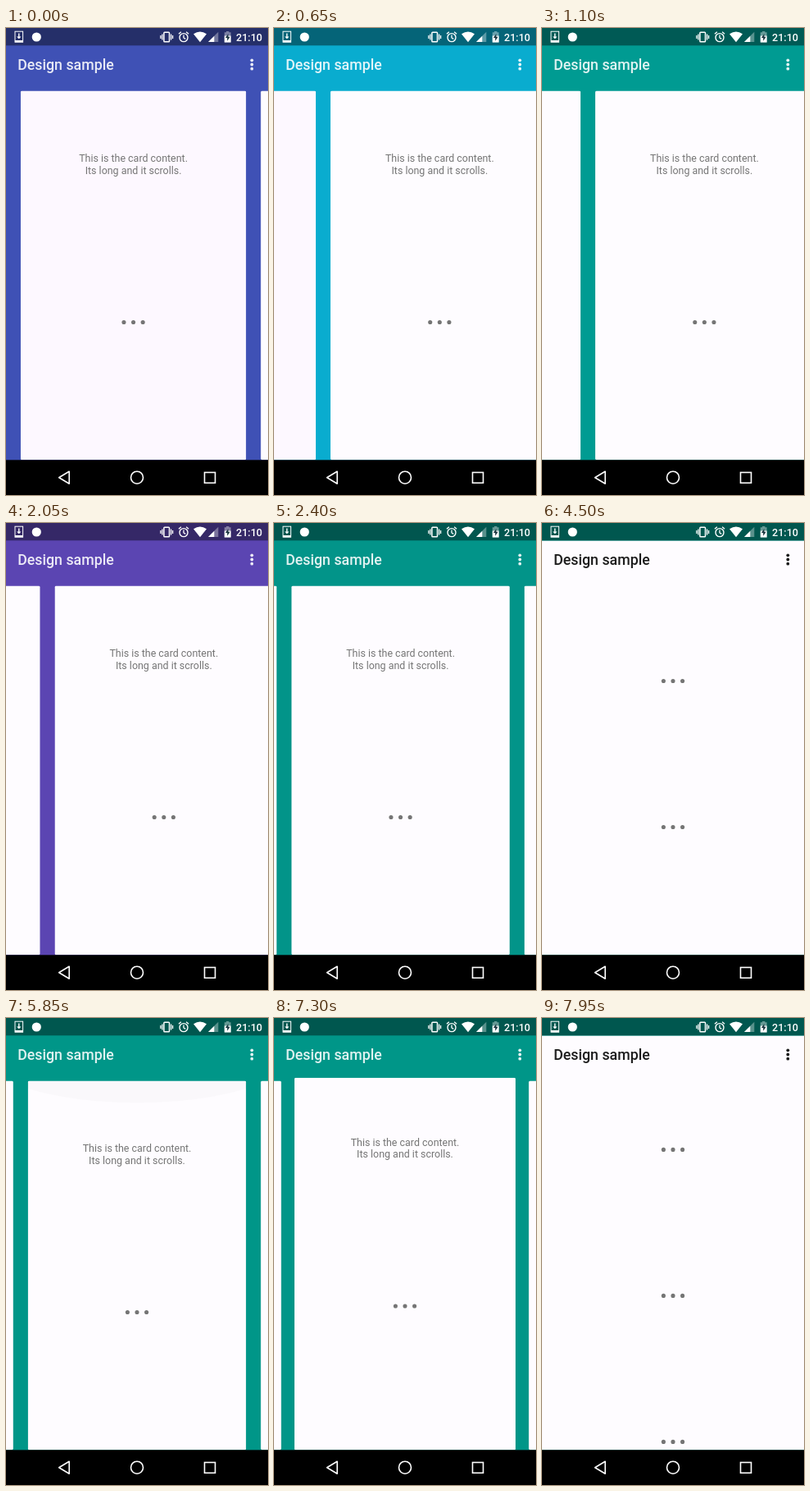
Animation of 320x569 px, one loop 8000 ms. Source, as an HTML page:

```html
<!DOCTYPE html>
<html lang="en">
<head>
<meta charset="utf-8">
<title>Design sample</title>
<style>
  html, body { margin: 0; width: 100%; height: 100%; overflow: hidden; background: #000; }
  #stage { display: block; width: 100%; height: 100%; }
  text { font-family: Roboto, "Noto Sans", sans-serif; }
  .body { font-size: 12.44px; fill: #757575; text-anchor: middle; }
  .title { font-size: 17.78px; font-weight: 500; }
  .clock { font-size: 12.6px; font-weight: 500; fill: #fff; }
  .line { fill: none; stroke: #fff; }
</style>
</head>
<body>
<svg id="stage" viewBox="0 0 320 569">
  <rect id="back" width="320" height="569"/>
  <g id="cards"></g>

  <g id="toolbar">
    <text class="title" x="14.2" y="51.2">Design sample</text>
    <circle cx="300.3" cy="39.3" r="1.9"/>
    <circle cx="300.3" cy="44.5" r="1.9"/>
    <circle cx="300.3" cy="49.7" r="1.9"/>
  </g>

  <rect id="status" width="320" height="21.33"/>
  <g fill="#fff">
    <rect class="line" x="11" y="4.2" width="9.6" height="13" stroke-width="1"/>
    <path d="M15.1 6.5h1.4v4h2L15.8 13.3 13.1 10.5h2zM11 15h9.6v2.2H11z"/>
    <circle cx="37.3" cy="11" r="5.6"/>
    <rect class="line" x="192.9" y="5.2" width="6.6" height="11.6" rx=".8" stroke-width="1.5"/>
    <path class="line" stroke-width="1.3" d="M190.9 7.5v7M188.9 9v4M201.6 7.5v7M203.6 9v4"/>
    <circle class="line" cx="217" cy="11.6" r="5" stroke-width="1.4"/>
    <path class="line" stroke-width="1.3" d="M217 8.6v3.4l2.3 1.4M210.9 7.3l3-2.5M223.1 7.3l-3-2.5"/>
    <path d="M229 7.3Q237 1.5 245 7.3L237 17.3z"/>
    <path d="M259.3 4.7V17H247z" opacity=".35"/>
    <path d="M254.3 9.7V17H247z"/>
    <path d="M269 4h3.4v1.3h2.2V17.5h-7.8V5.3h2.2z" opacity=".4"/>
    <path d="M266.8 9.5h7.8v8h-7.8z"/>
    <path d="M271.4 7l-3.4 5h2.2v3.8l3.4-5h-2.2z" fill="#17323c"/>
    <text class="clock" x="281" y="15.5">21:10</text>
  </g>

  <rect y="526.33" width="320" height="43"/>
  <g class="line" stroke-width="1.6">
    <path d="M64.7 547.7L77.2 540.3V555.2z" stroke-linejoin="round"/>
    <circle cx="160" cy="547.7" r="7.5"/>
    <rect x="242.5" y="541.5" width="13" height="12.8"/>
  </g>
</svg>

<script>
const LOOP = 8000, STEP = 50;
const MARGIN = 26.67, FIRST_MARGIN = 17.78, RIGHT = 320 - MARGIN, PITCH = 284.44;
const TOP = 76.44, OPEN_TOP = 21.33, BOTTOM = 526.33;
const OPEN_PAGE = 2, OPEN_DISTANCE = 112;
const $ = id => document.getElementById(id);

// Page colours: indigo, cyan, teal, deep purple, indigo
const colors = [[63, 81, 181], [0, 188, 212], [0, 150, 136], [103, 58, 183], [63, 81, 181]];

// Each move eases by 1 - (1 - u^pull)^drag: pull slows the start, drag the end
const pageMoves = [
  { at: 500, steps: 8, from: 0, to: PITCH, pull: 1.4, drag: 4 },
  { at: 1000, steps: 7, from: PITCH, to: 2 * PITCH, pull: 1, drag: 3.58 },
  { at: 1500, steps: 8, from: 2 * PITCH, to: 3 * PITCH, pull: 1.4, drag: 4 },
  { at: 2050, steps: 11, from: 3 * PITCH, to: 2 * PITCH, pull: 1.46, drag: 4 }
];
const scrollMoves = [
  { at: 3800, steps: 23, from: 0, to: 434.5, pull: 1.6, drag: 2.233 },
  { at: 5050, steps: 10, from: 434.5, to: 0, pull: 1.5, drag: 1.3 },
  { at: 7300, steps: 23, from: 0, to: 509, pull: 1.6, drag: 2.233 }
];
const GLOW_START = 5500, GLOW_END = 7300;

const clamp = v => Math.max(0, Math.min(1, v));
const lerp = (a, b, k) => a + (b - a) * k;
const mix = (a, b, k) => a.map((v, i) => lerp(v, b[i], k));
const rgb = c => `rgb(${c.map(Math.round).join()})`;

function valueAt(moves, t) {
  const move = moves.findLast(m => t >= m.at);
  if (!move) return moves[0].from;
  const u = clamp(((t - move.at) / STEP + 1) / move.steps);
  return lerp(move.from, move.to, 1 - (1 - u ** move.pull) ** move.drag);
}

// Overscroll glow left behind when the list hits its top
function glowAt(t) {
  if (t < GLOW_START || t >= GLOW_END) return 0;
  return lerp(.045, .016, clamp((t - GLOW_START) / 350));
}

function set(el, attrs) {
  for (const key in attrs) el.setAttribute(key, attrs[key]);
}

function add(parent, name, attrs, text = "") {
  const el = document.createElementNS("http://www.w3.org/2000/svg", name);
  set(el, attrs);
  el.textContent = text;
  return parent.appendChild(el);
}

function makeCard(page) {
  const box = add($("cards"), "svg", { overflow: "hidden" });
  const face = add(box, "rect", { fill: page ? "#fefcff" : "#fdf8ff" });
  const glow = add(box, "ellipse", { cy: -30, rx: 185, ry: 57, opacity: 0 });
  const content = add(box, "g", {});
  add(content, "text", { class: "body", y: 163.2 }, "This is the card content.");
  add(content, "text", { class: "body", y: 177.8 }, "Its long and it scrolls.");
  for (let row = 0; row < 5; row++)
    for (const x of [-11.6, 0, 11.6])
      add(content, "circle", { cx: x, cy: 358.5 + row * 178, r: 2.55, fill: "#757575" });
  return { page, box, face, glow, content };
}

const cards = colors.map((_, page) => makeCard(page));
$("cards").append(cards[OPEN_PAGE].box);

function placeCard(card, pageX, scroll, glow) {
  const open = clamp(scroll / OPEN_DISTANCE);
  const left = card.page ? MARGIN : FIRST_MARGIN;
  const x = (left + card.page * PITCH - pageX) * (1 - open);
  const y = lerp(TOP, OPEN_TOP, open);
  const width = lerp(RIGHT - left, 320, open);
  const height = BOTTOM - y;
  set(card.box, { x, y, width, height });
  set(card.face, { width, height, rx: 1.8 * (1 - open) });
  set(card.glow, { cx: width / 2, opacity: glow });
  set(card.content, { transform: `translate(${width / 2} ${-y - scroll})` });
}

function draw(t) {
  const pageX = valueAt(pageMoves, t);
  const scroll = valueAt(scrollMoves, t);
  const glow = glowAt(t);

  const pos = pageX / PITCH, page = Math.min(3, Math.floor(pos));
  const color = mix(colors[page], colors[page + 1], pos - page);
  $("back").setAttribute("fill", rgb(color));
  $("status").setAttribute("fill", rgb(mix(color, [0, 0, 0], .42)));

  const dark = clamp((scroll / OPEN_DISTANCE - .65) / .35);
  const light = mix(color, [255, 255, 255], .88);
  $("toolbar").setAttribute("fill", rgb(mix(light, [28, 28, 28], dark)));

  for (const card of cards) {
    const active = card.page === OPEN_PAGE;
    placeCard(card, pageX, active ? scroll : 0, active ? glow : 0);
  }
}

let begin;
function tick(now) {
  begin ??= now;
  const t = (now - begin) % LOOP;
  draw(Math.floor(t / STEP) * STEP);
  requestAnimationFrame(tick);
}
draw(0);
requestAnimationFrame(tick);
</script>
</body>
</html>
```
